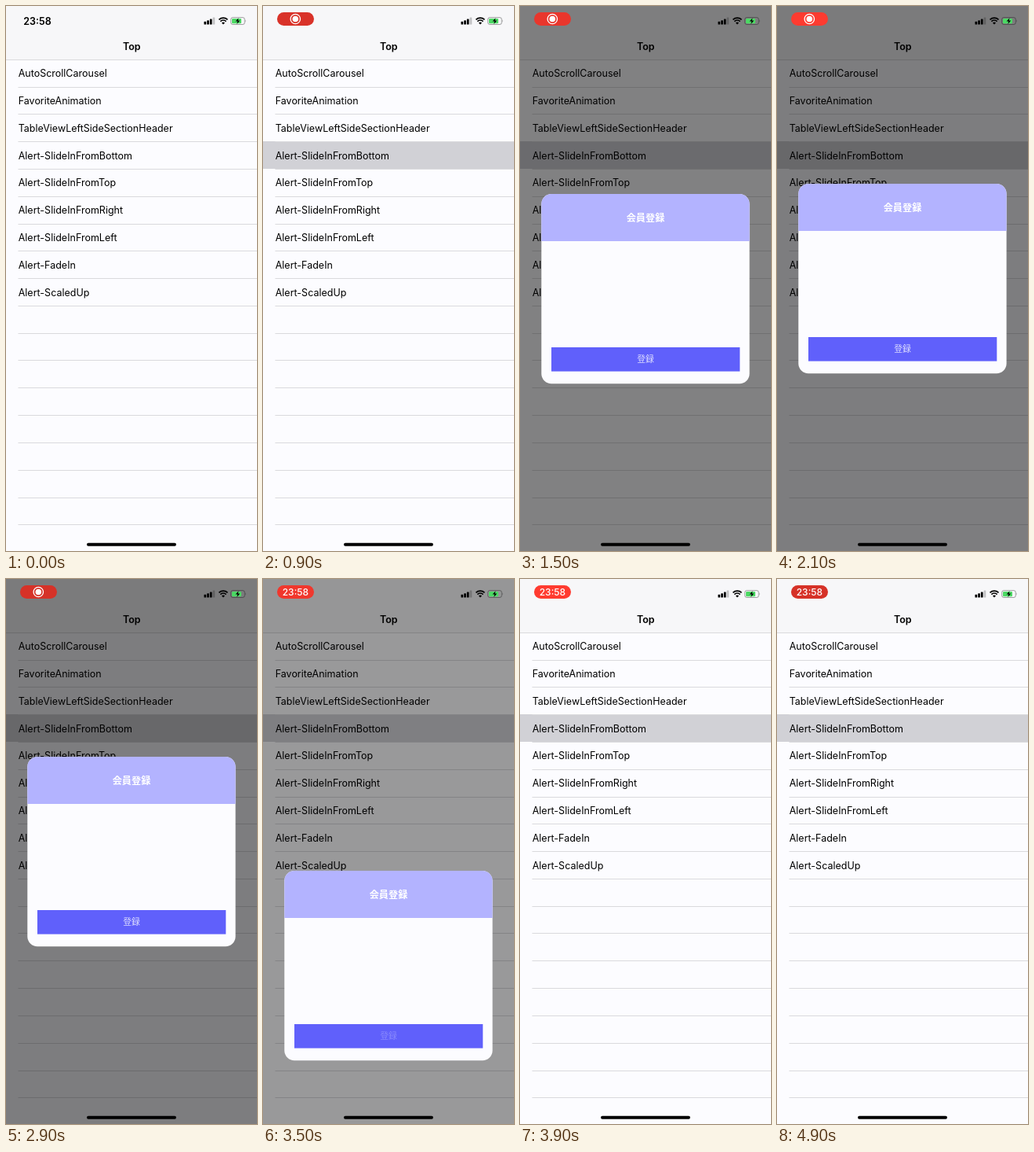
Write an HTML page that moves like this. It is 320 by 693 pixels and loops after 5 s.

```html
<!DOCTYPE html>
<html lang="ja">
<head>
<meta charset="utf-8">
<style>
html, body { margin: 0; width: 100%; height: 100%; overflow: hidden; }
svg { display: block; width: 100%; height: 100%; }
text { font: 12.5px Inter, "Noto Sans", sans-serif; }
.b { font-weight: 600; }
.jp { font-family: "Noto Sans CJK JP", "Noto Sans CJK", sans-serif; fill: #fff; text-anchor: middle; }
</style>
</head>
<body>
<svg viewBox="0 0 320 693" preserveAspectRatio="none">
  <rect width="320" height="693" fill="#fcfcff"/>
  <rect width="320" height="68" fill="#f7f7f9"/>
  <rect id="row" y="172" width="320" height="35" fill="#d1d1d6"/>
  <g id="lines" fill="#dadadd"></g>
  <g id="list"></g>
  <text class="b" x="160.3" y="55.5" text-anchor="middle">Top</text>
  <rect id="dim" width="320" height="693"/>

  <g id="modal">
    <rect x="27.3" width="265.3" height="241.3" rx="12.8" fill="#fcfcff"/>
    <path d="M27.3 60V12.8a12.8 12.8 0 0 1 12.8-12.8H279.8a12.8 12.8 0 0 1 12.8 12.8V60z" fill="#b3b3ff"/>
    <text class="jp" x="160" y="34.8" style="font-size:12.2px;font-weight:700">会員登録</text>
    <rect x="40" y="195" width="240.3" height="30.6" fill="#6060fb"/>
    <text class="jp" id="label" x="160" y="214.2" style="font-size:10.8px">登録</text>
  </g>

  <text class="b" id="clock" x="22.3" y="23.6">23:58</text>
  <g id="pill">
    <rect id="pillBg" x="18" y="8" width="47" height="17" rx="8.5"/>
    <g id="rec">
      <circle cx="41.3" cy="16.5" r="6.2" fill="none" stroke="#fff" stroke-width="1.3"/>
      <circle cx="41.3" cy="16.5" r="3.8" fill="#fff"/>
    </g>
    <text id="pillTime" x="41.4" y="20.8" text-anchor="middle" fill="#fff" style="font-size:12px;font-weight:500">23:58</text>
  </g>

  <g>
    <rect x="252.5" y="19.8" width="2.7" height="3.7" rx=".6"/>
    <rect x="256.2" y="18.3" width="2.7" height="5.2" rx=".6"/>
    <rect x="259.9" y="16.4" width="2.7" height="7.1" rx=".6"/>
    <rect x="263.6" y="14.4" width="2.7" height="9.1" rx=".6" opacity=".22"/>
    <path d="M277 23.6l-2-2.2a3 3 0 0 1 4 0z"/>
    <path d="M273.4 19.6a5.3 5.3 0 0 1 7.2 0M271.5 17.4a8 8 0 0 1 11 0" fill="none" stroke="#000" stroke-width="1.7"/>
    <rect x="286.7" y="14.6" width="17.6" height="8.9" rx="2.4" fill="none" stroke="#000" stroke-opacity=".4" stroke-width=".9"/>
    <path d="M305.3 17.5q1.4 1.5 0 3z" opacity=".4"/>
    <rect x="288" y="15.9" width="12" height="6.3" rx="1.3" fill="#4cd964"/>
    <path d="M296.6 15.2l-4 4.4h2.6l-.9 3.4 4-4.5h-2.6z"/>
    <rect x="103" y="682.8" width="114" height="3.9" rx="1.95"/>
  </g>
</svg>
<script>
const $ = id => document.getElementById(id);
const set = (id, name, value) => $(id).setAttribute(name, value);
const show = (id, on) => set(id, 'visibility', on ? 'visible' : 'hidden');
const make = (parent, tag, attrs) => {
  const el = document.createElementNS('http://www.w3.org/2000/svg', tag);
  for (const k in attrs) el.setAttribute(k, attrs[k]);
  return $(parent).appendChild(el);
};

const PITCH = 34.8, TOP = 68.2;
const items = ['AutoScrollCarousel', 'FavoriteAnimation', 'TableViewLeftSideSectionHeader',
  ...['SlideInFromBottom', 'SlideInFromTop', 'SlideInFromRight', 'SlideInFromLeft', 'FadeIn', 'ScaledUp']
    .map(s => 'Alert-' + s)];
items.forEach((s, i) => make('list', 'text', { x: 15.7, y: 90.2 + i * PITCH }).textContent = s);
for (let i = 0; i < 18; i++) {
  const x = i ? 15.5 : 0;
  make('lines', 'rect', { x, y: Math.round(TOP + i * PITCH - .5), width: 320 - x, height: 1 });
}

// Critically damped spring from 0 to 1
function spring(ms) {
  const w = Math.max(0, ms) * .013, v = 1 - (1 + w) * Math.exp(-w);
  return v > .983 ? 1 : v;
}

function draw(t) {
  const p = spring(t - 1049) - spring(t - 3434.6);
  show('row', t >= 900);
  set('dim', 'opacity', p / 2);
  set('modal', 'transform', `translate(0 ${Math.floor(226 + 693 * (1 - p))})`);
  set('label', 'opacity', t < 3300 ? .8 : .25);

  const pill = t >= 300, timed = t >= 3200;
  show('clock', !pill);
  show('pillBg', pill);
  show('rec', pill && !timed);
  show('pillTime', timed);
  const glow = .92 - .08 * Math.cos((t - 1050) / 1900 * 2 * Math.PI);
  set('pillBg', 'fill', `rgb(${[255, 59, 48].map(v => v * glow)})`);
}

// The screen refreshes ten times a second
const start = performance.now();
function tick() {
  draw(Math.floor((performance.now() - start) % 5000 / 100) * 100);
  requestAnimationFrame(tick);
}
tick();
</script>
</body>
</html>
```
